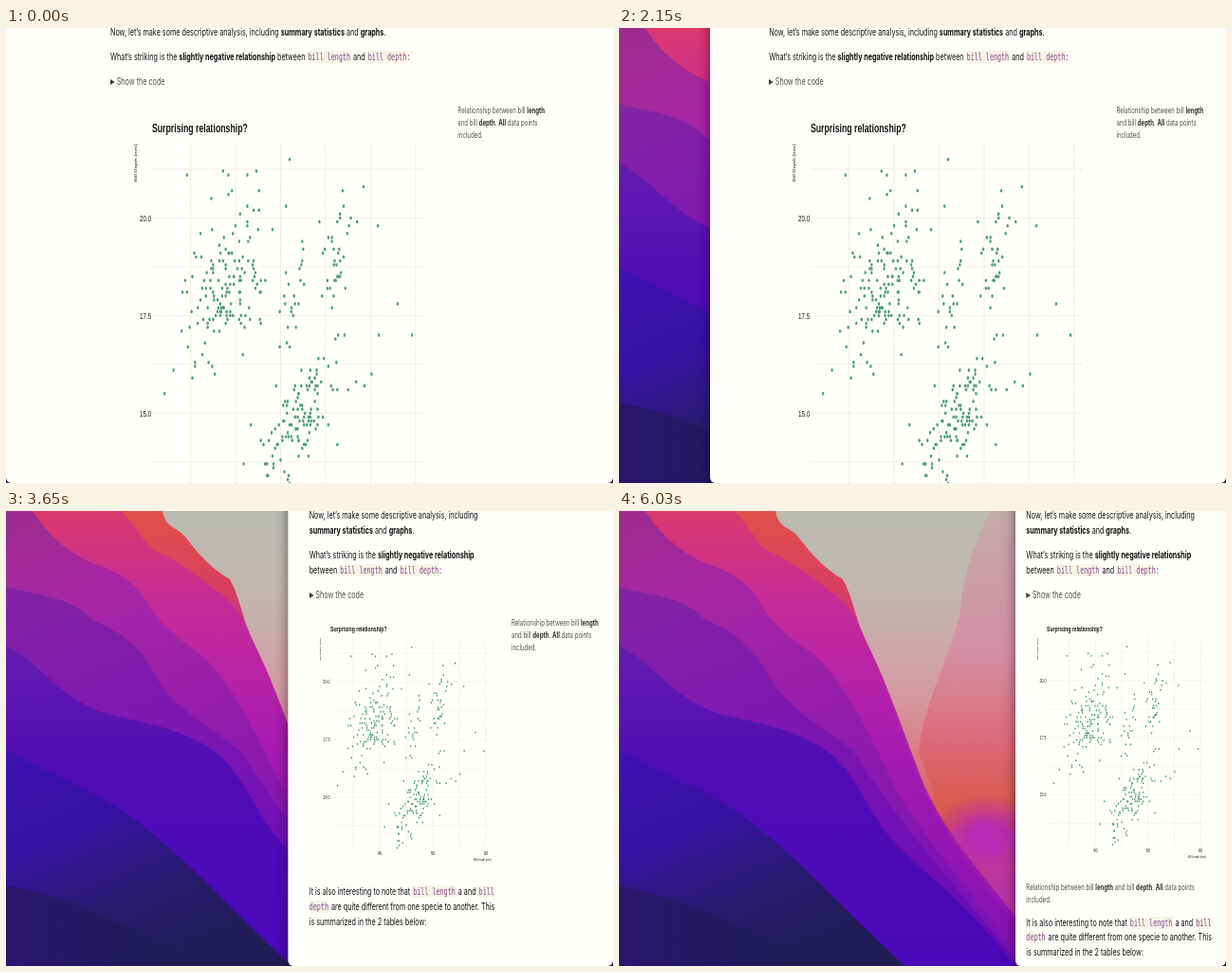
An HTML page for the animation above (6060 ms loop, 640 px wide and 480 px high).

```html
<!DOCTYPE html>
<html lang="en">
<head>
<meta charset="utf-8">
<title>Responsive report</title>
<style>
  html, body { margin: 0; width: 100%; height: 100%; overflow: hidden; background: #1c1d3c; }
  .wall { position: absolute; left: 0; top: 0; width: 640px; height: 480px; }

  /* The screen is squeezed sideways: 960 units fill 640 pixels. */
  .screen {
    position: absolute; left: 0; top: 0; width: 960px; height: 480px;
    overflow: hidden; transform: scaleX(.66667); transform-origin: 0 0;
  }
  .win {
    position: absolute; left: 0; right: 0; top: -20px; bottom: 0;
    overflow: hidden; border-radius: 8px / 6px;
    background: #fefefb; box-shadow: 0 4px 16px rgba(20, 0, 30, .55);
    container-type: inline-size;
    animation: resize 6060ms linear infinite;
  }
  @keyframes resize {
    0% { left: 0; }
    27.2% { left: 0; animation-timing-function: ease-in; }
    30.2% { left: 27px; }
    41.25% { left: 272px; }
    53.3% { left: 352px; }
    67.3% { left: 541px; animation-timing-function: ease-out; }
    72.3%, 100% { left: 627px; }
  }

  .page {
    padding: 17.1px max(177px, 50cqw - 218px) 0 max(81px, 50cqw - 315px);
    font: 10.8px/15.75px Inter, "Open Sans", sans-serif; color: #141412;
  }
  p { margin: 0 0 10.25px; }
  b { font-weight: 700; }
  code {
    font: 10.1px/1 "DejaVu Sans Mono", monospace; color: #84458f;
    background: #f7f4e6; padding: 1px 1.5px; border-radius: 2px;
  }
  .fold { color: #54544e; }
  .fold::before {
    content: ""; display: inline-block; margin-right: 3px;
    border: solid transparent; border-width: 3.5px 0 3.5px 7px; border-left-color: #3c3c38;
  }
  figure { position: relative; margin: -1.8px 0 10.5px; }
  .plot { display: block; width: min(100%, 514px); margin: 0 auto; }
  .plot text { font-family: "Liberation Sans", Arial, sans-serif; fill: #161614; }
  figcaption {
    position: absolute; left: calc(100% + 16.5px); top: 6.3px; width: 146px;
    font-size: 9.1px; line-height: 13px; color: #54544e;
  }
  figcaption b { color: #34342f; }

  @container (max-width: 642px) {
    .page { padding-left: 33.75px; padding-right: 177px; }
  }
  @container (max-width: 496px) {
    .page { padding-left: 17px; padding-right: 16.5px; }
    figcaption { position: static; width: auto; margin-top: 9.8px; }
  }
</style>
</head>
<body>
<svg class="wall" viewBox="0 0 640 480">
  <defs>
    <linearGradient id="sky" x2="0" y2="1">
      <stop offset="0" stop-color="#b9bbb2"/><stop offset=".18" stop-color="#c2b6af"/>
      <stop offset=".4" stop-color="#d49ba4"/><stop offset=".58" stop-color="#dd6f76"/>
      <stop offset=".68" stop-color="#d9544c"/><stop offset=".82" stop-color="#b934a4"/>
    </linearGradient>
    <linearGradient id="veil" x2="0" y2="1">
      <stop offset="0" stop-color="#c4aaaa"/><stop offset=".45" stop-color="#d48fa6"/>
      <stop offset=".75" stop-color="#de6672"/><stop offset="1" stop-color="#d8563f"/>
    </linearGradient>
    <radialGradient id="glow">
      <stop offset=".3" stop-color="#b92bb2"/><stop offset="1" stop-color="#b92bb2" stop-opacity="0"/>
    </radialGradient>
    <linearGradient id="ridge" x2="0" y2="1">
      <stop offset="0" stop-color="#e2504a"/><stop offset=".17" stop-color="#d83e60"/>
      <stop offset=".34" stop-color="#bb2a9c"/><stop offset="1" stop-color="#8c12b4"/>
    </linearGradient>
    <linearGradient id="rose" x2="0" y2="1">
      <stop offset="0" stop-color="#dc386e"/><stop offset=".2" stop-color="#c62c98"/>
      <stop offset=".5" stop-color="#a81bb0"/><stop offset="1" stop-color="#8010b4"/>
    </linearGradient>
    <linearGradient id="plum" x2=".4" y2="1">
      <stop offset="0" stop-color="#9c2c8c"/><stop offset=".22" stop-color="#a826a4"/>
      <stop offset="1" stop-color="#7c12b4"/>
    </linearGradient>
    <linearGradient id="violet" x2=".4" y2="1">
      <stop offset="0" stop-color="#8424a4"/><stop offset=".35" stop-color="#8019b0"/>
      <stop offset="1" stop-color="#6a0cb6"/>
    </linearGradient>
    <linearGradient id="deep" x2="0" y2="1">
      <stop offset="0" stop-color="#641cae"/><stop offset=".4" stop-color="#500cb6"/>
      <stop offset="1" stop-color="#4a08ba"/>
    </linearGradient>
    <linearGradient id="dusk" x2=".55" y2="1">
      <stop offset="0" stop-color="#3d12b6"/><stop offset=".4" stop-color="#3513a0"/>
      <stop offset=".7" stop-color="#281a70"/><stop offset="1" stop-color="#211c56"/>
    </linearGradient>
    <linearGradient id="navy">
      <stop offset="0" stop-color="#28166e"/><stop offset="1" stop-color="#1e1c52"/>
    </linearGradient>
  </defs>
  <path fill="url(#sky)" d="M0 0H440V480H0Z"/>
  <path fill="url(#veil)" d="M440 0H392C376 30 364 62 359 110C345 165 322 200 316 255L345 335H440Z"/>
  <ellipse fill="url(#glow)" cx="388" cy="345" rx="62" ry="46"/>
  <path fill="url(#ridge)" d="M0 0H165C168 18 180 17 188 26C200 42 215 60 236 72C246 90 250 115 258 132C285 185 300 235 322 290C345 340 380 380 418 428L460 480H0Z"/>
  <path fill="url(#rose)" d="M0 0H122C132 10 140 24 153 40C175 49 196 64 222 84C240 96 250 112 258 132C282 185 297 235 320 290C342 340 378 385 418 436L450 480H0Z"/>
  <path fill="url(#plum)" d="M0 0H28C42 22 58 38 88 54C112 62 132 70 146 92C164 124 182 134 206 152C236 178 262 230 290 290C320 345 370 400 430 480H0Z"/>
  <path fill="url(#violet)" d="M0 80C36 90 68 90 90 114C122 128 142 142 160 178C180 210 220 232 246 252C276 300 330 370 425 480H0Z"/>
  <path fill="url(#deep)" d="M0 142C36 160 60 202 110 215C160 226 200 234 230 262C260 296 265 325 300 360C340 395 380 430 418 480H0Z"/>
  <path fill="url(#dusk)" d="M0 252C60 285 110 303 140 329C200 375 250 435 302 480H0Z"/>
  <path fill="url(#navy)" d="M0 395C50 405 90 420 130 440C160 454 182 466 200 480H0Z"/>
</svg>

<div class="screen">
  <div class="win">
    <div class="page">
      <p>Now, let’s make some descriptive analysis, including <b>summary statistics</b> and <b>graphs</b>.</p>
      <p>What’s striking is the <b>slightly negative relationship</b> between <code>bill length</code> and <code>bill depth</code>:</p>
      <p class="fold">Show the code</p>
      <figure>
        <svg class="plot" viewBox="0 0 150 138"></svg>
        <figcaption>Relationship between bill <b>length</b> and bill <b>depth</b>. <b>All</b> data points included.</figcaption>
      </figure>
      <p>It is also interesting to note that <code>bill length</code> a and <code>bill depth</code> are quite different from one specie to another. This is summarized in the 2 tables below:</p>
    </div>
  </div>
</div>

<script>
  // Scales: bill length and depth in mm to plot units
  const X = mm => 54.9 + 4.155 * (mm - 40);
  const Y = mm => 37.17 + 12.02 * (20 - mm);
  const LEFT = 16.5, RIGHT = 142.2, TOP = 14.3, BOTTOM = 124;

  let seed = 29;
  const random = () => (seed = (seed * 16807) % 2147483647) / 2147483647;
  function normal() {
    let z;
    do z = Math.sqrt(-2 * Math.log(random())) * Math.cos(2 * Math.PI * random());
    while (Math.abs(z) > 1.9);
    return z;
  }

  // Points that stand apart from the clusters
  const points = [
    [34.6, 21.1], [38.6, 21.2], [39.2, 21.1], [41.3, 21.1], [42.3, 21.2], [46, 21.5],
    [37.3, 20.5], [39.2, 20.6], [39.6, 20.7], [41.3, 20.3], [42, 20.2], [42.6, 20.7],
    [45.6, 20.3], [44.1, 19.7], [54.2, 20.8], [51.9, 20.7], [52, 20.3], [51.6, 20],
    [52.8, 20], [53.5, 19.9], [49.3, 19.9], [51.3, 19.9], [55.8, 19.8], [58, 17.8],
    [59.6, 17], [55.9, 17], [52.1, 17], [32.1, 15.5], [33.1, 16.1], [35.5, 16.2],
    [35.2, 15.9], [37.7, 16], [34, 17.1], [34.4, 18.4], [34.1, 18.1], [47.6, 18.3],
    [55.1, 16], [54.3, 15.7], [53.4, 15.8], [52.5, 15.6], [51.3, 14.2], [41.7, 14.7],
    [40.9, 13.7], [44.5, 15.7], [46, 13.2]
  ];

  // count, mean length, spread, mean depth, spread, correlation
  function cluster(n, length, sl, depth, sd, r) {
    while (n--) {
      const a = normal(), b = r * a + Math.sqrt(1 - r * r) * normal();
      points.push([length + sl * a, depth + sd * b].map(v => Math.round(v * 10) / 10));
    }
  }
  cluster(130, 38.9, 2.4, 18.15, 1, .25);
  cluster(30, 51, .9, 18.9, .75, .4);
  cluster(22, 46.2, .8, 17.8, .75, .5);
  cluster(115, 46.9, 2.4, 14.8, .95, .72);

  const line = (x1, y1, x2, y2) => `M${x1} ${y1}L${x2} ${y2}`;
  const label = (x, y, size, anchor, str, more = "") =>
    `<text x="${x}" y="${y}" font-size="${size}" text-anchor="${anchor}" ${more}>${str}</text>`;

  let rows = "", cols = "", labels = "";
  for (let d = 13.75; d < 22; d += 1.25) rows += line(LEFT, Y(d), RIGHT, Y(d));
  for (let l = 35; l <= 60; l += 5) cols += line(X(l), TOP, X(l), BOTTOM);
  for (const d of [15, 17.5, 20]) labels += label(16, Y(d) + 1, 2.75, "end", d.toFixed(1));
  for (const l of [40, 50, 60]) labels += label(X(l), 127.7, 2.75, "middle", l);

  labels += label(16.3, 10.8, 3.83, "start", "Surprising relationship?", 'font-weight="700"');
  labels += label(RIGHT, 130.6, 1.92, "end", "Bill Length (mm)");
  labels += label(-20.2, 9.2, 1.68, "middle", "Bill Depth (mm)", 'transform="rotate(-90)"');

  document.querySelector(".plot").innerHTML =
    `<g fill="none" stroke="#e0e0b4" stroke-dasharray=".35 .35">
       <path stroke-width=".28" d="${rows}"/><path stroke-width=".4" d="${cols}"/></g>
     <g fill="#559f78">${points.map(([l, d]) =>
       `<circle cx="${X(l).toFixed(2)}" cy="${Y(d).toFixed(2)}" r=".55"/>`).join("")}</g>` + labels;
</script>
</body>
</html>
```
